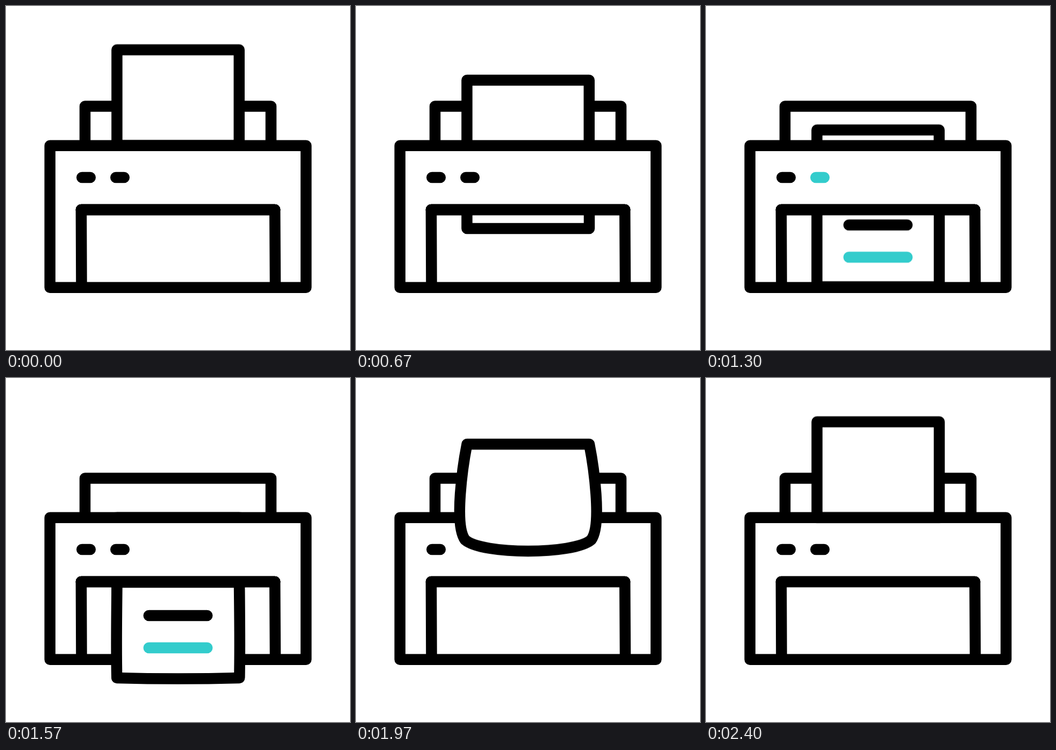
These frames come from a looping animation (640x640 px, 2.5 s). An HTML page:

```html
<!DOCTYPE html>
<html lang="en">
<head>
<meta charset="utf-8">
<title>Printer</title>
<style>
  html, body { margin: 0; height: 100%; overflow: hidden; background: #fff; }
  svg {
    display: block; width: 100vw; height: 100vh;
    fill: none; stroke: #000; stroke-width: 20.5;
    stroke-linecap: round; stroke-linejoin: round;
  }
  .white { fill: #fff; }
  .teal { stroke: #33cccc; }

  .input, .output, .rise, .bend, .show-print, .led {
    animation: 2.5s cubic-bezier(.333, 0, .667, 1) infinite;
  }
  .input { animation-name: input; }
  .output { animation-name: output; }
  .rise { animation-name: rise; }
  .bend { animation-name: bend, show-sheet; animation-timing-function: cubic-bezier(.333, 0, .667, 1), step-end; }
  .show-print { animation-name: show-print; animation-timing-function: step-end; }
  .led { animation-name: led; animation-timing-function: step-end; }

  /* three feeds through the printer */
  @keyframes input {
    0%, 13.2% { transform: translateY(81.5px); }
    26.8%, 34.6% { transform: translateY(138px); }
    45.2% { transform: translateY(186px); }
    57.2%, 100% { transform: translateY(259.75px); }
  }
  @keyframes output {
    0%, 13.2% { transform: translateY(349px); }
    26.8%, 34.6% { transform: translateY(414px); }
    45.2% { transform: translateY(469.5px); }
    57.2%, 100% { transform: translateY(557px); }
  }

  /* the printed sheet flies back up, dragging and then overshooting */
  @keyframes rise {
    0%, 66.9% { transform: translateY(380px); }
    82.5%, 100% { transform: translateY(81.5px); }
  }
  @keyframes bend {
    0%, 61.3%, 96%, 100% {
      d: path("M206.5 0C206.5 59 206.5 119 206.5 178C282 178 358 178 434 178C434 119 434 59 434 0C358 0 282 0 206.5 0Z");
    }
    70.7%, 78.8% {
      d: path("M206.5 0C199 38 182 150 203 178C235 206 405 206 437.5 178C458.5 150 441.5 38 434 0C358 0 282 0 206.5 0Z");
    }
    84.4% {
      d: path("M203.7 0C186.9 34 200.5 136 206.5 178C282 178 358 178 434 178C440 136 453.6 34 436.8 0C395.6 -22.4 244.4 -22.4 203.7 0Z");
    }
  }

  @keyframes show-sheet { 0% { opacity: 0; } 62.6%, 100% { opacity: 1; } }
  @keyframes show-print { 0% { opacity: 1; } 63.8%, 100% { opacity: 0; } }
  @keyframes led {
    0% { stroke: #000; opacity: 1; }
    34.7% { stroke: #33cccc; opacity: 1; }
    56% { stroke: #000; opacity: 1; }
    63.8% { stroke: #000; opacity: 0; }
    95.8%, 100% { stroke: #000; opacity: 1; }
  }
</style>
</head>
<body>
<svg viewBox="0 0 640 640">
  <clipPath id="slot"><rect y="379" width="640" height="261"/></clipPath>

  <path d="M147 260V186.5H493V260"/>
  <rect class="input white" x="206.4" width="227.4" height="178"/>

  <rect class="white" x="81.75" y="259.75" width="476.5" height="264"/>
  <path d="M141.25 319H156.75"/>
  <path class="led" d="M204.25 319H219.75"/>
  <path d="M140.5 523L139.9 379H500.2L501 523"/>

  <g clip-path="url(#slot)">
    <g class="show-print">
      <rect class="output white" x="206.4" y="-178" width="227.6" height="178"/>
    </g>
  </g>
  <path d="M139.9 379H500.2"/>

  <g class="rise">
    <path class="bend white" d="M206.5 0C206.5 59 206.5 119 206.5 178C282 178 358 178 434 178C434 119 434 59 434 0C358 0 282 0 206.5 0Z"/>
  </g>

  <g clip-path="url(#slot)">
    <g class="show-print">
      <g class="output">
        <path class="teal" d="M265.75 -55H374.25"/>
        <path d="M265.75 -115H374.25"/>
      </g>
    </g>
  </g>
  <path class="show-print" d="M139.9 379H500.2"/>
</svg>
</body>
</html>
```
